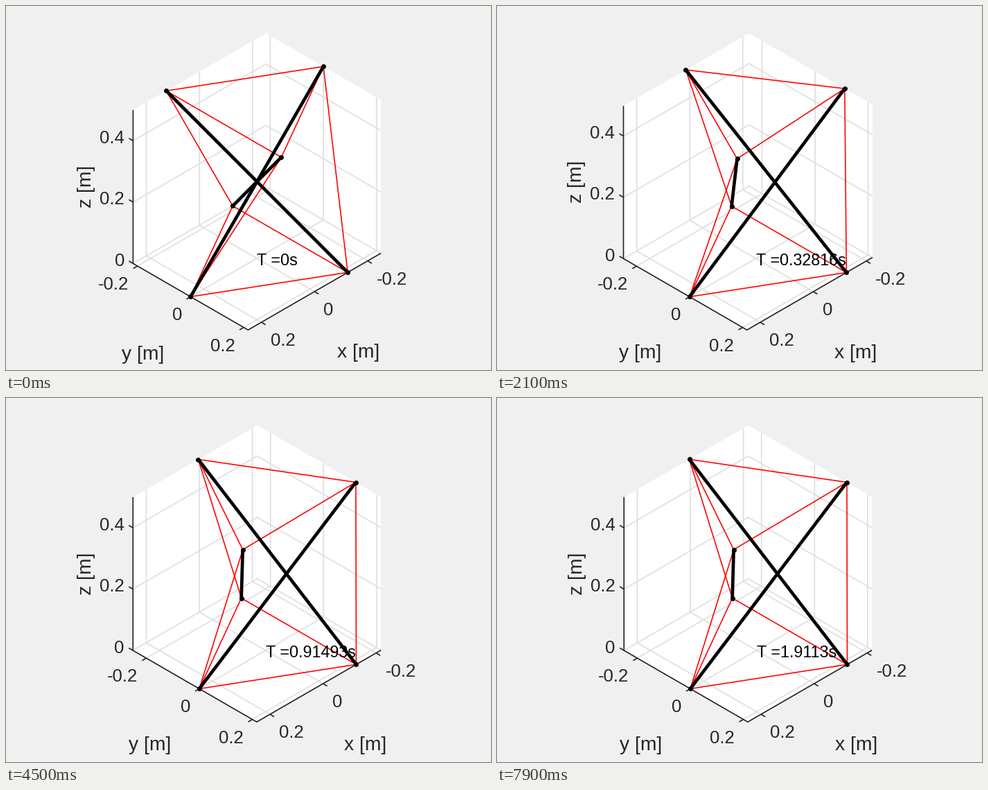
A matplotlib script that plays this animation: 700 by 525 pixels, repeating every 8 s.

```python
import numpy as np
import matplotlib.pyplot as plt
from matplotlib.animation import FuncAnimation

W, H, FRAMES = 700, 525, 80
PT = 0.72  # points per pixel at 100 dpi
TOP, BOTTOM, MID = 0.075 * H, 0.89 * H, 362.25
ISO = 1 / np.sqrt(3)
DARK = (0.15, 0.15, 0.15)
GRID = (0.873, 0.873, 0.873)
RADIUS = 0.25

plt.rcParams["font.family"] = "Liberation Sans"
fig = plt.figure(figsize=(W / 100, H / 100), dpi=100, facecolor="#f0f0f0")
ax = fig.add_axes([0, 0, 1, 1])

# Simulated time reached at some steps of the solver
STEPS = np.array([0, 14, 28, 45, 57, 70, 79])
TIMES = np.array([0, 0.18641, 0.4898, 0.91493, 1.2409, 1.6055, 1.9113])
RATES = np.gradient(TIMES, STEPS, edge_order=2)


def sim_time(n):
    """Cubic Hermite interpolation through the known times."""
    i = min(np.searchsorted(STEPS, n, side="right") - 1, len(STEPS) - 2)
    d = STEPS[i + 1] - STEPS[i]
    u = (n - STEPS[i]) / d
    return ((1 + 2 * u) * (1 - u) ** 2 * TIMES[i] + u * (1 - u) ** 2 * d * RATES[i]
            + u * u * (3 - 2 * u) * TIMES[i + 1] + u * u * (u - 1) * d * RATES[i + 1])


def ring(radius, turn, z):
    a = np.radians(np.array([0, 120, 240]) + turn)
    return np.column_stack([radius * np.cos(a), radius * np.sin(a), np.full(3, z)])


def prism(t):
    """Damped twist around -30 degrees with a short axial bounce."""
    phase = np.pi * (2.83 * t + 1 - np.exp(-t / 0.3))
    swing = 15 * (np.exp(-10 * t) + np.exp(-0.85 * t)) * np.cos(phase)
    radius = RADIUS - 2.3e-5 * swing ** 2 * (1 - np.exp(-10 * t))
    twist = np.radians(swing - 30)
    strut = 0.696 + 0.027 * np.exp(-10 * t) * np.cos(70 * t + 1.147)
    flat = RADIUS ** 2 + radius ** 2 + 2 * RADIUS * radius * np.cos(twist)
    height = np.sqrt(strut ** 2 - flat)
    return ring(RADIUS, 0, 0), ring(radius, 150 + swing, height)


def line(pts, color, width, z):
    x, y = zip(*pts)
    ax.plot(x, y, color=color, lw=width * PT, zorder=z, solid_capstyle="butt")


def label(x, y, s, size, ha, color=DARK, **kw):
    ax.text(x, y, s, fontsize=size * PT, ha=ha, va="baseline",
            color=color, zorder=9, **kw)


def tick(p, step, text_dx, text_dy, ha, value):
    line([p, (p[0] + step[0], p[1] + step[1])], DARK, 1.7, 4)
    label(p[0] + text_dx, p[1] + text_dy + 9, f"{value:g}", 25.7, ha)


def draw(n):
    t = sim_time(n)
    low, high = prism(t)
    nodes = np.vstack([low, high])
    x0, y0, _ = nodes.min(axis=0)
    x1, y1, z1 = nodes.max(axis=0)
    lx, ly = x1 - x0, y1 - y0

    # Fit the box height into the plot area
    k = (BOTTOM - TOP) / (ISO * (lx + ly + 2 * z1))
    front = MID + k * (ly - lx) / 2

    def proj(x, y, z):
        dx, dy = x - x1, y - y1
        return front + k * (dy - dx), BOTTOM + k * ISO * (dx + dy - 2 * z)

    ax.cla()
    ax.set_xlim(0, W)
    ax.set_ylim(H, 0)
    ax.axis("off")

    outline = [proj(x1, y0, 0), proj(x1, y1, 0), proj(x0, y1, 0),
               proj(x0, y1, z1), proj(x0, y0, z1), proj(x1, y0, z1)]
    ax.fill(*zip(*outline), color="white", lw=0, zorder=1)

    xticks = [-0.2, 0, 0.2] if x0 <= -0.2 else [-0.1, 0, 0.1, 0.2]
    for v in xticks:
        line([proj(v, y1, 0), proj(v, y0, 0), proj(v, y0, z1)], GRID, 1.7, 2)
        tick(proj(v, y1, 0), (6, 3.5), 13.2, 25, "left", v)
    for v in (-0.2, 0, 0.2):
        line([proj(x1, v, 0), proj(x0, v, 0), proj(x0, v, z1)], GRID, 1.7, 2)
        tick(proj(x1, v, 0), (-6, 3.5), -12.5, 25, "right", v)
    for v in (0, 0.2, 0.4):
        line([proj(x1, y0, v), proj(x0, y0, v), proj(x0, y1, v)], GRID, 1.7, 2)
        tick(proj(x1, y0, v), (-6, -3.5), -12.5, -5.5, "right", v)
    line([outline[5], *outline[:3]], DARK, 1.7, 4)

    # Axis names sit beside the middle of each axis
    for name, side, span, mid in (("x", 1, lx, proj((x0 + x1) / 2, y1, 0)),
                                  ("y", -1, ly, proj(x1, (y0 + y1) / 2, 0))):
        px = k * span
        label(mid[0] + side * (116.2 - 0.28 * px) + 1, mid[1] + 64 + 0.16 * px,
              f"{name} [m]", 28.2, "center")
    zx, zy = proj(x1, y0, z1 / 2)
    ax.text(zx - 60.5, zy - 0.5, "z [m]", fontsize=28.2 * PT, color=DARK, rotation=90,
            rotation_mode="anchor", ha="center", va="baseline", zorder=9)

    a, b = [proj(*p) for p in low], [proj(*p) for p in high]
    for i in range(3):
        j = (i + 2) % 3
        for cable in ((a[i], a[j]), (b[i], b[j]), (a[i], b[j])):
            line(cable, "red", 1.6, 5)
        line((a[i], b[i]), "black", 4.7, 6)
    ax.plot(*zip(*a, *b), "o", color="black", ms=7 * PT, mew=0, zorder=7)

    ox, oy = proj(0, 0, 0)
    label(ox, oy + 10, f"T ={t:.5g}s", 23.4, "left", "black")
    return []


anim = FuncAnimation(fig, draw, frames=FRAMES, interval=100, repeat=True,
                     repeat_delay=0, blit=False)
plt.show()
```
